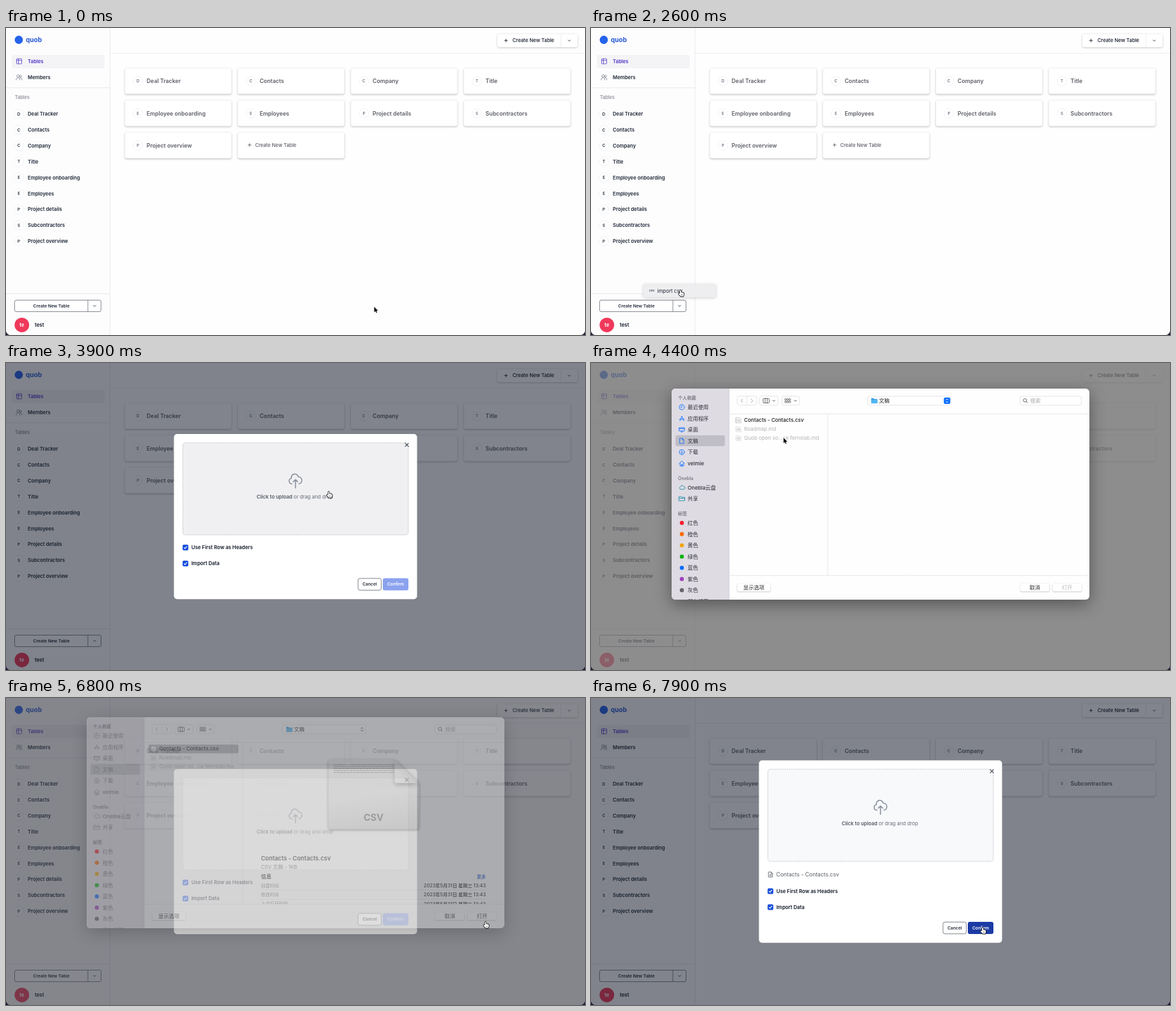
These frames come from a looping animation (905 px wide and 480 px high, 8 s). An HTML page with a canvas:

```html
<!DOCTYPE html>
<html lang="en">
<head>
<meta charset="utf-8">
<title>Import a table</title>
<style>
html, body { margin: 0; width: 100%; height: 100%; overflow: hidden; background: #fff; }
canvas { display: block; width: 905px; height: 480px; }
</style>
</head>
<body>
<canvas id="stage"></canvas>
<script>
const W = 905, H = 480, LOOP = 8000, TICK = 100;
const ratio = window.devicePixelRatio || 1;

function setup(canvas) {
  canvas.width = W * ratio;
  canvas.height = H * ratio;
  return canvas.getContext('2d');
}

const stage = setup(document.getElementById('stage'));
const layer = setup(document.createElement('canvas'));
let c = stage; // context the helpers draw on

const BLUE = '#0a6cff', INK = '#1f2937', GRAY = '#5d6068';
const TABLES = ['Deal Tracker', 'Contacts', 'Company', 'Title', 'Employee onboarding',
  'Employees', 'Project details', 'Subcontractors', 'Project overview'];

// Events, in ms
const MENU_AT = 1700, MODAL_AT = 2900, OPEN_AT = 3900, SELECT_AT = 4900,
  CLOSE_AT = 6650, CLOSED_AT = 6950, FILE_AT = 7100;

// Pointer tip: time, x, y
const PATH = [
  [100, 575.5, 436], [200, 540, 437], [300, 430, 438], [400, 345, 437], [500, 345, 437],
  [700, 250, 436], [1000, 150, 432], [1200, 137, 430], [1900, 137, 430], [2300, 138.5, 410],
  [3000, 138.5, 410], [3300, 380, 270], [3600, 503, 201], [4100, 503, 201], [4200, 425, 177],
  [4300, 425, 177], [4400, 301, 117], [4500, 288, 96], [4700, 282, 86], [5100, 282, 86],
  [5500, 600, 290], [5800, 735, 347], [6000, 737, 348], [6600, 738, 348], [6800, 748, 350],
  [7000, 748, 350], [7300, 660, 362], [7600, 614, 363], [7900, 610.5, 359], [8000, 610.5, 359]
];

const clamp = v => Math.max(0, Math.min(1, v));
const ramp = (t, a, b) => clamp((t - a) / (b - a));

function pointer(t) {
  if (t <= PATH[0][0]) return PATH[0].slice(1);
  const i = PATH.findIndex(p => p[0] >= t);
  const [t0, x0, y0] = PATH[i - 1], [t1, x1, y1] = PATH[i];
  const k = ramp(t, t0, t1);
  return [x0 + (x1 - x0) * k, y0 + (y1 - y0) * k];
}

function text(s, x, y, size, weight, color, align = 'left') {
  c.font = `${weight} ${size}px Inter, "Noto Sans CJK SC", "Noto Sans CJK", sans-serif`;
  c.textAlign = align;
  c.fillStyle = color;
  c.fillText(s, x, y + size * 0.36);
}

function box(x, y, w, h, r, fill, stroke, lw = 0.8) {
  c.beginPath();
  c.roundRect(x, y, w, h, r);
  if (fill) { c.fillStyle = fill; c.fill(); }
  if (stroke) { c.strokeStyle = stroke; c.lineWidth = lw; c.stroke(); }
}

function shadowBox(x, y, w, h, r, fill, blur, dy, shade) {
  c.save();
  c.shadowColor = shade;
  c.shadowBlur = blur * ratio;
  c.shadowOffsetY = dy * ratio;
  box(x, y, w, h, r, fill);
  c.restore();
}

function line(color, lw, ...pts) {
  c.beginPath();
  for (let i = 0; i < pts.length; i += 2) c.lineTo(pts[i], pts[i + 1]);
  c.strokeStyle = color;
  c.lineWidth = lw;
  c.stroke();
}

function disc(x, y, r, fill, stroke, lw = 0.7) {
  c.beginPath();
  c.arc(x, y, r, 0, 7);
  if (fill) { c.fillStyle = fill; c.fill(); }
  if (stroke) { c.strokeStyle = stroke; c.lineWidth = lw; c.stroke(); }
}

function shape(d, x, y, k, fill, stroke, lw) {
  const p = new Path2D(d);
  c.save();
  c.translate(x, y);
  c.scale(k, k);
  c.lineJoin = c.lineCap = 'round';
  if (stroke) { c.strokeStyle = stroke; c.lineWidth = lw; c.stroke(p); }
  if (fill) { c.fillStyle = fill; c.fill(p); }
  c.restore();
}

const chevron = (x, y, color, s = 2) => line(color, 0.9, x - s, y - s / 2, x, y + s / 2, x + s, y - s / 2);

function plus(x, y, color) {
  line(color, 0.9, x - 2.7, y, x + 2.7, y);
  line(color, 0.9, x, y - 2.7, x, y + 2.7);
}

function badge(letter, x, y, color) {
  disc(x, y, 7.3, '#fff', '#ebecef');
  text(letter, x, y, 6.2, 600, color, 'center');
}

function sidebar() {
  box(0, 0, 162, H, 0, '#fdfdfe');
  line('#e6e7ea', 0.9, 162.5, 0, 162.5, H);
  disc(20, 18.5, 6.4, '#2563eb');
  text('quob', 31, 18.3, 10, 700, '#2557d6');

  box(9, 42, 145, 21, 3, '#f4f4f6');
  box(16.5, 48, 8, 8, 1, null, '#5033c8');
  line('#5033c8', 0.8, 16.5, 50.7, 24.5, 50.7);
  line('#5033c8', 0.8, 19.4, 48, 19.4, 56);
  text('Tables', 34, 52.3, 7.7, 600, '#5033c8');

  disc(18.8, 75, 1.9, null, '#6b7280');
  disc(22.7, 75.3, 1.5, null, '#6b7280');
  shape('M0 4.5 C0 -0.5 6 -0.5 6 4.5 M6 .8 C8.5 .6 9 2.5 9 4', 15.8, 76.8, 1, null, '#6b7280', 0.8);
  text('Members', 34, 77.2, 7.78, 600, INK);
  line('#e6e7ea', 0.9, 0, 93.5, 162, 93.5);

  text('Tables', 13.7, 108.2, 7.5, 400, '#747881');
  TABLES.forEach((name, i) => {
    const y = 134.4 + i * 24.87;
    badge(name[0], 20, y, INK);
    text(name, 34, y, 7.78, 600, INK);
  });

  line('#e6e7ea', 0.9, 0, 415.5, 162, 415.5);
  box(13.5, 425.5, 135, 18, 2.5, '#fff', '#656a74');
  line('#656a74', 0.8, 128, 425.5, 128, 443.5);
  text('Create New Table', 71, 434.6, 6.67, 600, INK, 'center');
  chevron(138.5, 434.5, INK);
  disc(24.8, 464.3, 11.4, '#f0395a');
  text('te', 24.8, 464.3, 7.4, 700, '#fff', 'center');
  text('test', 45, 464.4, 7.9, 600, '#111827');
}

function card(i) {
  const x = 185.8 + (i % 4) * 176.6, y = 62.6 + Math.floor(i / 4) * 50.3;
  shadowBox(x, y, 166.6, 40.4, 3, '#fff', 3, 1.3, 'rgba(0,0,0,.27)');
  box(x, y, 166.6, 40.4, 3, '#fff', '#e9eaed', 0.6);
  if (i < TABLES.length) {
    badge(TABLES[i][0], x + 20.4, y + 20.5, '#6b7280');
    text(TABLES[i], x + 34, y + 20.6, 8.75, 600, GRAY);
  } else {
    plus(x + 18.3, y + 19.7, GRAY);
    text('Create New Table', x + 27, y + 19.9, 7.6, 500, GRAY);
  }
}

function page() {
  box(0, 0, W, H, 0, '#fefefe');
  sidebar();
  line('#ebecef', 0.9, 163, 39.5, W, 39.5);
  shadowBox(768, 9.5, 125.5, 20.5, 3, '#fff', 3, 0.8, 'rgba(0,0,0,.25)');
  line('#e5e7eb', 0.8, 867.3, 9.5, 867.3, 30);
  plus(781.5, 19.6, INK);
  text('Create New Table', 791.7, 19.7, 7.7, 500, '#111827');
  chevron(880.3, 19.6, INK);
  for (let i = 0; i <= TABLES.length; i++) card(i);
}

function corners() {
  shape('M0 0 V6 H6 Q1 5 0 0 Z', 0, 474, 1, '#1d1432');
  shape('M6 0 V6 H0 Q5 5 6 0 Z', 899, 474, 1, '#1d1432');
}

function menu(y) {
  const hot = y < 421;
  shadowBox(82, 400.5, 113, 20.5, 2, hot ? '#eeeef0' : '#fff', 5, 1, 'rgba(0,0,0,.2)');
  text('CSV', 95, 410.5, 3.9, 700, '#374151', 'center');
  text('import csv', 103.5, 410.7, 7.9, 400, INK);
}

function checkbox(label, y) {
  box(276, y - 4.5, 9, 9, 2, '#1c52dc');
  line('#fff', 1.1, 278.2, y, 279.9, y + 1.8, 283, y - 1.8);
  text(label, 289.7, y, 7.8, 600, '#111827');
}

function modal(hasFile, [px, py], held) {
  const top = hasFile ? 97.5 : 111, extra = hasFile ? 27 : 0;
  box(262.5, top, 380, 258.2 + extra, 5, '#fff');
  const hot = held || (px > 276 && px < 629 && py > top + 14 && py < top + 158);
  c.setLineDash([2, 1.2]);
  box(276.4, top + 13.8, 352.4, 144, 4, hot ? '#f0f0f2' : '#f8f9fb', '#b3b7bf', 0.8);
  c.setLineDash([]);
  shape('M7 16a4 4 0 01-.88-7.903A5 5 0 1115.9 6L16 6a5 5 0 011 9.9M15 13l-3-3m0 0l-3 3m3-3v12',
    439.3, top + 60.3, 1.1, null, '#8a909c', 1.5);
  const lead = 'Click to upload';
  text(lead, 391.8, top + 98.3, 7.78, 600, '#555b66');
  text('or drag and drop', 391.8 + c.measureText(lead + ' ').width, top + 98.3, 7.78, 400, '#666c78');
  const y = top + 17;
  line('#3f4650', 1.1, 623.6, y - 2.9, 629.4, y + 2.9);
  line('#3f4650', 1.1, 623.6, y + 2.9, 629.4, y - 2.9);

  if (hasFile) {
    const f = top + 178.5;
    shape('M0 0 H3.6 L6 2.4 V8 H0 Z M3.6 0 V2.4 H6 M1.5 4.3 H4.5 M1.5 6 H4.5', 277.7, f - 4, 1, null, '#565b64', 0.8);
    text('Contacts - Contacts.csv', 289.6, f, 8.6, 400, '#565b64');
  }
  checkbox('Use First Row as Headers', top + 177.5 + extra);
  checkbox('Import Data', top + 202.5 + extra);

  const by = top + 235 + extra;
  box(550.2, by - 9.2, 36.4, 18.4, 3, '#fff', '#5f646e');
  text('Cancel', 568.4, by, 6.7, 600, INK, 'center');
  const over = px > 589 && px < 629 && Math.abs(py + 2 - by) < 9;
  box(589, by - 9.4, 40, 18.8, 3, !hasFile ? '#8ba2ee' : over ? '#1c3aa4' : '#1d4fd8');
  text('Confirm', 609, by, 6.7, 600, '#fff', 'center');
}

// File dialog parts
const ICONS = {
  clock: 'M8 4 A4 4 0 1 1 0 4 A4 4 0 1 1 8 4 M4 1.6 V4.2 H2.2',
  apps: 'M1 7.8 L4 .5 L7 7.8 M0 5.3 H8',
  desk: 'M0 1 H8 V6 H0 Z M0 2.4 H8 M2.5 7.6 H5.5',
  doc: 'M1 0 H4.8 L7 2.3 V8 H1 Z M4.8 0 V2.3 H7',
  down: 'M8 4 A4 4 0 1 1 0 4 A4 4 0 1 1 8 4 M4 1.8 V6 M2.4 4.5 L4 6.1 L5.6 4.5',
  home: 'M0 4 L4 .3 L8 4 M1.2 3.5 V8 H6.8 V3.5 M3.2 8 V5.3 H4.8 V8',
  cloud: 'M2 6.8 A2 2 0 0 1 1.7 3 A2.7 2.7 0 0 1 6.8 2.6 A2.1 2.1 0 0 1 7 6.8 Z',
  folder: 'M-.3 1 H3 L4 2 H8.5 V7.3 H-.3 Z M-.3 3.6 H8.5'
};
const PLACES = [['clock', '最近使用'], ['apps', '应用程序'], ['desk', '桌面'],
  ['doc', '文稿'], ['down', '下载'], ['home', 'velmie']];
const TAGS = [['红色', '#fb1f2d'], ['橙色', '#f96a06'], ['黄色', '#f3a30a'], ['绿色', '#0db312'],
  ['蓝色', BLUE], ['紫色', '#9d41bf'], ['灰色', '#65666a']];

function pickerSide(active) {
  const ink = active ? '#303036' : '#77757d';
  const label = (s, y) => text(s, 151, y, 8.2, 500, ink);
  const head = (s, y) => text(s, 136, y, 7, 600, '#7c7a84');
  const place = (icon, s, y, color) => {
    shape(ICONS[icon], 138, y - 4, 1, null, active ? color : '#8d8b94', 0.85);
    label(s, y);
  };
  head('个人收藏', 54);
  box(132, 113, 77.3, 17, 3, '#bfbdc5');
  PLACES.forEach(([icon, s], i) => place(icon, s, 69 + i * 17.6, BLUE));
  head('Onebla', 180.7);
  place('cloud', 'Onebla云盘', 194.6, '#1489a8');
  place('folder', '共享', 212, '#1489a8');
  head('标签', 235);
  TAGS.forEach(([s, color], i) => {
    const y = 250 + i * 17.55;
    disc(142, y, 3.2, color);
    label(s, y);
  });
  label('所有标签…', 373);
}

function pickerBar(active) {
  const edge = '#dedee0', dark = '#454548';
  box(228.5, 51.8, 30.5, 14.2, 3, null, edge);
  line(edge, 0.8, 243.7, 51.8, 243.7, 66);
  line('#a9a9ac', 1, 237.2, 56, 234.4, 59, 237.2, 62);
  line('#a9a9ac', 1, 250, 56, 252.8, 59, 250, 62);
  box(263.5, 51.8, 29, 14.2, 3, null, edge);
  box(269, 55.5, 9.5, 7, 1, null, dark);
  line(dark, 0.8, 272.2, 55.5, 272.2, 62.5);
  line(dark, 0.8, 275.4, 55.5, 275.4, 62.5);
  chevron(285.7, 59, dark);
  box(298.5, 51.8, 27.5, 14.2, 3, null, edge);
  for (let i = 0; i < 6; i++) box(303 + (i % 3) * 3.3, 55.8 + Math.floor(i / 3) * 3.8, 2.3, 2.4, 0.4, null, dark, 0.7);
  chevron(319.5, 59, dark);

  box(432.3, 52, 130, 14, 3, '#fff', edge);
  shape('M0 0 H3.5 L4.5 1.2 H9.5 V8 H0 Z', 438, 55, 1, '#3b9fe6');
  box(438, 57.4, 9.5, 5.8, 0.6, '#53b7f2');
  text('文稿', 450, 59, 8.4, 500, '#2a2a2d');
  if (active) box(551.5, 54, 10, 10, 2.5, BLUE);
  const mark = active ? '#fff' : '#333';
  line(mark, 1, 554.6, 58, 556.5, 56.1, 558.4, 58);
  line(mark, 1, 554.6, 60, 556.5, 61.9, 558.4, 60);

  box(670.5, 52, 96, 14, 3, '#fff', edge);
  disc(678.3, 58.3, 2.6, null, '#555', 0.9);
  line('#555', 1, 680.2, 60.3, 682.3, 62.5);
  text('搜索', 686.5, 59, 8.2, 400, '#a9a9ac');
}

function fileRow(name, y, color, weight, back) {
  if (back) box(222.5, y - 6.8, 140.8, 13.8, 3, back);
  shape('M0 0 H5 L7.5 2.2 V8 H0 Z', 227, y - 4, 1, '#f4f4f5', weight > 400 ? '#909094' : '#cfcfd2', 0.7);
  for (let i = 0; i < 2; i++) line('#aaa', 0.6, 228.4, y - 0.5 + i * 1.8, 233, y - 0.5 + i * 1.8);
  text(name, 239.3, y, 8.05, weight, color);
}

function gradient(x0, y0, x1, y1, ...colors) {
  const g = c.createLinearGradient(x0, y0, x1, y1);
  colors.forEach((color, i) => g.addColorStop(i / (colors.length - 1), color));
  return g;
}

function shadowShape(d, fill, blur, dy, shade) {
  c.save();
  c.shadowColor = shade;
  c.shadowBlur = blur * ratio;
  c.shadowOffsetY = dy * ratio;
  shape(d, 0, 0, 1, fill);
  c.restore();
}

function preview() {
  shadowShape('M507 106 H608 L645.5 143 V212 Q645.5 215 642.5 215 H507 Q504 215 504 212 V109 Q504 106 507 106 Z',
    gradient(560, 106, 575, 215, '#ededed', '#f3f3f3', '#d6d6d6'), 4, 1.5, 'rgba(0,0,0,.5)');
  c.setLineDash([2.6, 0.7, 1.6, 0.9, 4, 0.8]);
  for (let i = 0; i < 5; i++) {
    c.lineDashOffset = i * 4;
    line('#88888b', 1.1, 512, 114.5 + i * 3, 607, 114.5 + i * 3);
  }
  c.setLineDash([]);
  shadowShape('M607.5 106 L645.5 143 H611 Q607.5 143 607.5 139 Z',
    gradient(607, 143, 630, 120, '#fff', '#f4f4f4', '#d4d4d4'), 7, 3, 'rgba(0,0,0,.4)');
  text('CSV', 574.5, 197, 14.6, 700, '#6a6a6c', 'center');

  text('Contacts - Contacts.csv', 398.5, 261, 9.3, 600, '#2a2a2c');
  text('CSV 文稿 - 1KB', 398.5, 274, 8, 400, '#757578');
  text('信息', 398.5, 289, 8.2, 700, '#2a2a2c');
  text('更多', 750, 289, 7, 600, '#2462d0', 'right');
  ['创建时间', '修改时间', '上次打开时间'].forEach((label, i) => {
    const y = 303.3 + i * 14.3;
    text(label, 398.5, y, 7, 500, '#77777a');
    text('2023年5月31日 星期三 13:43', 750, y, 7.25, 600, '#303033', 'right');
    line('#dededf', 0.7, 398.5, y + 7, 750, y + 7);
  });
}

function button(label, x, w, color, fill = '#fff') {
  shadowBox(x, 345, w, 12.6, 3, fill, 1.6, 0.4, 'rgba(0,0,0,.35)');
  text(label, x + w / 2, 351.2, 8.3, 500, color, 'center');
}

function picker(selected, active) {
  shadowBox(126, 40, 653, 330, 6, '#fefefe', 26, 7, 'rgba(0,0,0,.4)');
  c.beginPath();
  c.roundRect(126, 40, 653, 330, 6);
  c.clip();
  box(126, 40, 90, 330, 0, '#dedbe3');
  line('#cfcdd4', 0.7, 216, 40, 216, 370);
  line('#e2e2e4', 0.8, 216, 79.5, 779, 79.5);
  line('#e2e2e4', 0.8, 370, 79.5, 370, 332);
  line('#e2e2e4', 0.8, 216, 332.3, 779, 332.3);
  pickerSide(active);
  pickerBar(active);
  const lit = selected && active;
  fileRow('Contacts - Contacts.csv', 89.6, lit ? '#fff' : '#1c1c1e', 500,
    selected && (active ? '#0a5cd8' : '#bcbcbf'));
  fileRow('Roadmap.md', 103.6, '#b4b4b7', 400);
  fileRow('Quob open so...ce fernslab.md', 117.5, '#b4b4b7', 400);
  button('显示选项', 228.5, 52, '#2a2a2d');
  button('取消', 671, 45.5, '#2a2a2d');
  button('打开', 721.5, 45.5, lit ? '#fff' : selected ? '#2a2a2d' : '#b8b8bb', lit ? '#0b73fb' : '#fff');
  if (selected) {
    c.save();
    c.beginPath();
    c.rect(370.5, 80, 408, 252);
    c.clip();
    preview();
    c.restore();
  }
}

// The dialog is drawn whole, then slid and faded as one sheet
function sheet(p, selected, active) {
  c = layer;
  c.setTransform(ratio, 0, 0, ratio, 0, 0);
  c.clearRect(0, 0, W, H);
  c.save();
  picker(selected, active);
  box(126, 40, 653, 330, 0, `rgba(0,0,0,${0.34 * (1 - p)})`);
  c.restore();
  c = stage;
  c.globalAlpha = p;
  c.drawImage(layer.canvas, 0, -20 * (1 - p), W, H);
  c.globalAlpha = 1;
}

function drawPointer([x, y], hand) {
  if (hand) {
    shape('M1.6 5.2 V1.2 Q1.6 0 2.5 0 Q3.4 0 3.4 1.2 V3.6 Q4.4 3 5 3.8 Q6 3.3 6.5 4.2 Q7.8 4 7.8 5.3 L7.3 8 L6.6 9.6 H2.8 L-.2 6.4 Q-.9 5.2 .3 4.8 Z',
      x - 1, y, 1, '#fff', '#111', 1.6);
    line('#333', 0.5, x + 2.7, y + 6, x + 2.7, y + 8.2);
    line('#333', 0.5, x + 4.2, y + 6, x + 4.2, y + 8.2);
  } else {
    shape('M0 0 V8.6 L2 6.8 L3.3 9.8 L4.8 9.1 L3.5 6.2 H6.2 Z', x, y, 0.95, '#000', '#fff', 1.3);
  }
}

function isHand(t, [x, y]) {
  if (t < MODAL_AT) return x < 149;
  if (t <= OPEN_AT) return x > 276 && y < 269;
  if (t < CLOSE_AT) return false;
  return t < 7100 || (x < 629 && t > 7300);
}

function draw(t) {
  const tip = pointer(t);
  c.setTransform(ratio, 0, 0, ratio, 0, 0);
  page();
  if (t >= MENU_AT && t < MODAL_AT) menu(tip[1]);
  if (t >= MODAL_AT) {
    box(0, 0, W, H, 0, 'rgba(17,24,39,.53)');
    const active = t < CLOSE_AT;
    const p = active ? ramp(t, OPEN_AT, OPEN_AT + 200) : 1 - ramp(t, CLOSE_AT, CLOSED_AT);
    c.globalAlpha = active ? 1 : 1 - p * p;
    modal(t >= FILE_AT, tip, p > 0);
    c.globalAlpha = 1;
    if (p > 0) {
      box(0, 0, W, H, 0, `rgba(156,152,146,${0.5 * p * p})`);
      sheet(p, t >= SELECT_AT, active);
    }
  }
  corners();
  drawPointer(tip, isHand(t, tip));
}

const start = performance.now();
function frame() {
  const t = (performance.now() - start) % LOOP;
  draw(Math.floor(t / TICK) * TICK);
  requestAnimationFrame(frame);
}
frame();
</script>
</body>
</html>
```
